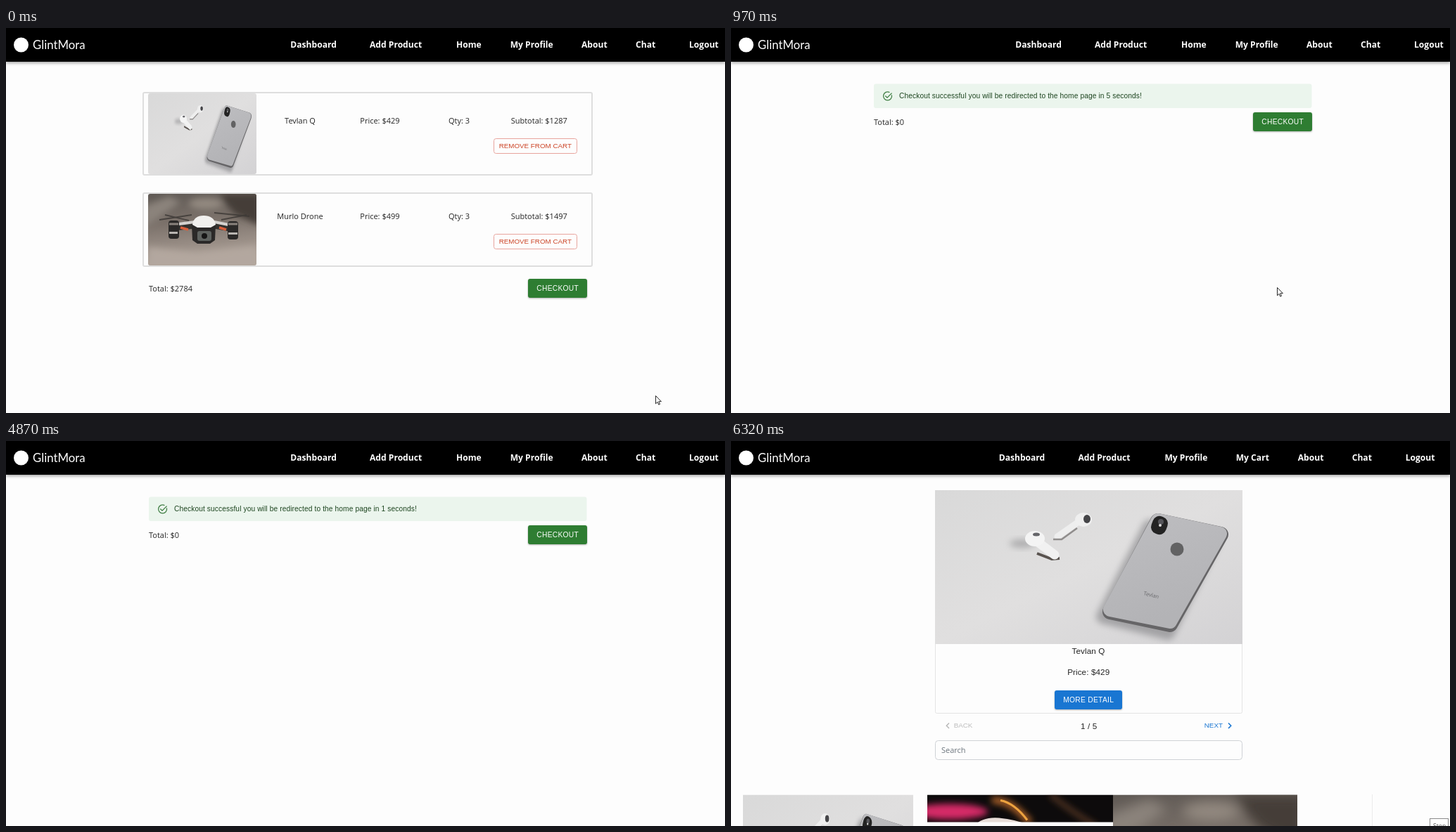
Recreate the animation shown at these times as an HTML page. Size 1022 by 548 pixels, loop 6.38 s.

```html
<!DOCTYPE html>
<html lang="en">
<head>
<meta charset="utf-8">
<title>Shop checkout</title>
<style>
html, body { margin: 0; width: 100%; height: 100%; overflow: hidden; background: #fdfdfd; }
svg { display: block; position: absolute; left: 0; top: 0; }
text { font: 11px "Open Sans", "Noto Sans", sans-serif; fill: #242424; }
.nav text { font-size: 12.1px; font-weight: 700; fill: #fff; }
.brand { font: 16.8px Lato, sans-serif; fill: #fff; }
.mid { text-anchor: middle; }
.ui { font: 11.66px "Liberation Sans", Arial, sans-serif; letter-spacing: .009em; }
.btn { font: 10.25px "Liberation Sans", Arial, sans-serif; letter-spacing: .0286em; fill: #fff; }
.small { font: 9.8px "Liberation Sans", Arial, sans-serif; }
.remove { fill: #cc4527; }
.frame { fill: none; stroke: #dedede; stroke-width: 2; }
.field { fill: #fdfdfd; stroke: #cfd2d6; }
.hint { fill: #6c757d; }
.raised { filter: drop-shadow(0 1.5px 1px rgba(0,0,0,.3)); }
#alert { position: absolute; left: 239px; top: 90px; white-space: nowrap; color: #1e4620;
  font: 10.2px/14px "Liberation Sans", Arial, sans-serif; letter-spacing: .0107em; }

/* 6380 ms loop */
.step { animation: 6.38s step-end infinite; }
.cart { animation-name: cart; }
.done { animation-name: done; }
.shop { animation-name: shop; }
.wait { animation-name: wait; }
.home { animation-name: home; }
.tip { animation-name: tip; }
.tile2 { animation-name: tile2; }
.tile3 { animation-name: tile3; }
.arrow { animation-name: arrow; }
.hand { animation-name: hand; }
.left::after { content: "5"; animation: count 6.38s step-end infinite; }
.hover { animation: hover 6.38s linear infinite; }
.leave { animation: leave 6.38s linear infinite; }
.pointer { animation: move 6.38s linear infinite; }

@keyframes cart { 0% { visibility: visible } 9.561%, 100% { visibility: hidden } }
@keyframes done { 0% { visibility: hidden } 9.561% { visibility: visible } 85.58%, 100% { visibility: hidden } }
@keyframes shop { 0% { visibility: visible } 85.58%, 100% { visibility: hidden } }
@keyframes wait { 0% { visibility: hidden } 85.58% { visibility: visible } 88.401%, 100% { visibility: hidden } }
@keyframes home { 0% { visibility: hidden } 88.401%, 100% { visibility: visible } }
@keyframes tip { 0% { visibility: hidden } 93.887%, 100% { visibility: visible } }
@keyframes tile2 { 0% { visibility: hidden } 97.022%, 100% { visibility: visible } }
@keyframes tile3 { 0% { visibility: hidden } 99.06%, 100% { visibility: visible } }
@keyframes arrow {
  0% { visibility: visible } 4.389% { visibility: hidden }
  9.561% { visibility: visible } 76.332%, 100% { visibility: hidden }
}
@keyframes hand { 0% { visibility: hidden } 4.389% { visibility: visible } 9.561%, 100% { visibility: hidden } }
@keyframes count {
  0% { content: "5" } 24.138% { content: "4" } 39.655% { content: "3" }
  54.702% { content: "2" } 69.906%, 100% { content: "1" }
}
@keyframes hover { 0%, 4.389% { fill: #2e7d32 } 8.307%, 100% { fill: #1b5e20 } }
@keyframes leave { 0%, 10.3% { fill: #1b5e20 } 15.204%, 100% { fill: #2e7d32 } }
@keyframes move {
  0%, .313% { transform: translate(923px,523px); animation-timing-function: cubic-bezier(.35,.1,.35,1) }
  6.426%, 72.1% { transform: translate(776px,369px); animation-timing-function: cubic-bezier(.4,.2,.8,.9) }
  76.332%, 100% { transform: translate(972px,545px) }
}
</style>
</head>
<body>
<svg width="1022" height="548" viewBox="0 0 1022 548">
  <defs>
    <linearGradient id="desk" x2="1" y2="1">
      <stop stop-color="#d9d9d9"/><stop offset=".5" stop-color="#e0dfdf"/><stop offset="1" stop-color="#d3d2d4"/>
    </linearGradient>
    <linearGradient id="shell" x2=".4" y2="1">
      <stop stop-color="#bdbdc0"/><stop offset="1" stop-color="#b3b3b6"/>
    </linearGradient>
    <linearGradient id="ground" x2=".15" y2="1">
      <stop stop-color="#5f5954"/><stop offset=".45" stop-color="#7d736c"/><stop offset="1" stop-color="#b0a49b"/>
    </linearGradient>
    <filter id="soft" x="-50%" y="-50%" width="200%" height="200%"><feGaussianBlur stdDeviation="5"/></filter>
    <clipPath id="round1"><rect x="202" y="93" width="154" height="115" rx="3"/></clipPath>
    <clipPath id="round2"><rect x="202" y="236" width="154" height="102" rx="3"/></clipPath>

    <symbol id="phone" viewBox="0 0 437 219" preserveAspectRatio="none">
      <rect width="437" height="219" fill="url(#desk)"/>
      <g stroke-linejoin="round">
        <path d="M312 48 246 176 338 199 402 70Z" transform="translate(-7 4)" fill="#77777a" stroke="#77777a" stroke-width="20" opacity=".55" filter="url(#soft)"/>
        <path d="M317 44 249 173 334 191 406 63Z" fill="#666567" stroke="#666567" stroke-width="22"/>
        <path d="M317 43 249 170 334 187 405 62Z" fill="url(#shell)" stroke="url(#shell)" stroke-width="20"/>
      </g>
      <rect x="308" y="37" width="22" height="26" rx="10" transform="rotate(20 319 50)" fill="#232323"/>
      <circle cx="321" cy="45" r="4" fill="#55555a"/>
      <circle cx="320" cy="50" r="2" fill="#ddd"/>
      <circle cx="344" cy="84" r="9.5" fill="#626263"/>
      <text x="296" y="149" transform="rotate(14 296 149)" style="font-size:7.5px;fill:#68686b">Tevlan</text>
      <ellipse cx="124" cy="76" rx="18" ry="6" fill="#858587" opacity=".55" filter="url(#soft)"/>
      <path d="M145 90 166 98 177 97" stroke="#59534f" stroke-width="4" fill="none"/>
      <path d="M141 70 170 92" stroke="#f1f1f1" stroke-width="13" stroke-linecap="round"/>
      <ellipse cx="142" cy="69" rx="14" ry="11" fill="#f4f4f4"/>
      <ellipse cx="144" cy="63" rx="5" ry="2.5" fill="#66666a"/>
      <path d="M207 43 174 66" stroke="#eee" stroke-width="9" stroke-linecap="round"/>
      <path d="M168 70 180 70 202 54" stroke="#908d8c" stroke-width="2.5" fill="none"/>
      <ellipse cx="211" cy="42" rx="12" ry="10" fill="#efefef"/>
      <ellipse cx="216" cy="41" rx="5" ry="6" fill="#454548"/>
    </symbol>

    <symbol id="drone" viewBox="0 0 154 102" preserveAspectRatio="none">
      <rect width="154" height="102" fill="url(#ground)"/>
      <g filter="url(#soft)">
        <path d="M100 0H160V46L122 28Z" fill="#453e39"/>
        <ellipse cx="82" cy="14" rx="24" ry="8" fill="#938980"/>
        <path d="M-5 18 30 4 46 12-5 48Z" fill="#8b837c"/>
        <path d="M0 76 70 84 154 74V106H0Z" fill="#b3a79f"/>
      </g>
      <path d="M16 37 62 30M24 30 58 38M94 27 144 32M104 37 140 30" stroke="#3c3835" stroke-width="1.8" opacity=".8"/>
      <path d="M36 48 66 45M94 45 122 50" stroke="#34322f" stroke-width="9"/>
      <path d="M44 43 66 40M94 40 114 44" stroke="#d5d2cf" stroke-width="4"/>
      <path d="M46 48 57 51M101 48 111 51" stroke="#d9603c" stroke-width="3.5"/>
      <g fill="#2b2928">
        <rect x="29" y="38" width="15" height="26" rx="4"/><rect x="113" y="39" width="15" height="26" rx="4"/>
        <path d="M62 44H96L95 66 88 71H70L63 66Z"/>
      </g>
      <path d="M30 54H42V57H30ZM114 55H127V58H114Z" fill="#b9b5b1"/>
      <path d="M30 43H43M114 43H127" stroke="#89827c" stroke-width="3"/>
      <path d="M63 44C64 35 70 31 79 31S95 35 96 44L89 48H70Z" fill="#f1f0ee"/>
      <rect x="70" y="53" width="20" height="14" rx="3" fill="#5e625f"/>
      <circle cx="80" cy="60" r="4" fill="#161616"/>
    </symbol>

    <g id="nav2" class="nav">
      <text y="27.5"><tspan x="393">Dashboard</tspan><tspan x="505.7">Add Product</tspan><tspan x="628.7">My Profile</tspan><tspan x="730">My Cart</tspan><tspan x="818">About</tspan><tspan x="895">Chat</tspan><tspan x="971">Logout</tspan></text>
    </g>
    <g id="remove">
      <rect x="693.5" y="157.5" width="118" height="21" rx="3" fill="#fdfdfd" stroke="#e8a49d"/>
      <text class="small remove mid" x="752.3" y="171.2">REMOVE FROM CART</text>
    </g>
    <rect id="pad" width="84" height="27" rx="3"/>
  </defs>

  <rect width="1022" height="548" fill="#fdfdfd"/>
  <rect width="1022" height="48" style="filter:drop-shadow(0 2px 2px rgba(0,0,0,.35))"/>
  <circle cx="21.5" cy="24" r="10.5" fill="#fff"/>
  <text class="brand" x="38" y="30">GlintMora</text>

  <g class="step shop nav">
    <text y="27.5"><tspan x="404.3">Dashboard</tspan><tspan x="517">Add Product</tspan><tspan x="640">Home</tspan><tspan x="716.7">My Profile</tspan><tspan x="818">About</tspan><tspan x="895">Chat</tspan><tspan x="971">Logout</tspan></text>
  </g>

  <g class="step cart">
    <rect class="frame" x="195" y="92" width="638" height="117" rx="2"/>
    <g clip-path="url(#round1)"><use href="#phone" x="202" y="93" width="154" height="115"/></g>
    <text class="mid" y="135.5"><tspan x="418">Tevlan Q</tspan></text>
    <text y="135.5"><tspan x="503.3">Price: $429</tspan><tspan x="629">Qty: 3</tspan><tspan x="717.7">Subtotal: $1287</tspan></text>
    <use href="#remove"/>

    <rect class="frame" x="195" y="235" width="638" height="104" rx="2"/>
    <g clip-path="url(#round2)"><use href="#drone" x="202" y="236" width="154" height="102"/></g>
    <text class="mid" y="271.5"><tspan x="418">Murlo Drone</tspan></text>
    <text y="271.5"><tspan x="503.3">Price: $499</tspan><tspan x="629">Qty: 3</tspan><tspan x="717.7">Subtotal: $1497</tspan></text>
    <use href="#remove" y="136"/>

    <text x="203" y="374.7">Total: $2784</text>
    <g class="raised"><use class="hover" href="#pad" x="742" y="357"/></g>
    <text class="btn mid" x="784.2" y="374.2">CHECKOUT</text>
  </g>

  <g class="step done">
    <rect x="203" y="79.5" width="622.5" height="34.5" rx="3" fill="#ebf5ed"/>
    <path d="M228.4 95.4A6 6 0 1 1 225.4 91.6M219.3 96.5 222 99.2 228.6 92.6" fill="none" stroke="#417f45" stroke-width="1.3"/>
    <text x="203" y="137.5">Total: $0</text>
    <g class="raised"><use class="leave" href="#pad" x="742" y="120"/></g>
    <text class="btn mid" x="784.2" y="137">CHECKOUT</text>
  </g>

  <g class="step wait">
    <use href="#nav2"/>
    <rect class="field" x="296.5" y="73.5" width="436" height="27" rx="4"/>
    <text class="hint" x="305.3" y="91.7">Search</text>
  </g>

  <g class="step home">
    <use href="#nav2" x="-12.3"/>
    <rect x="290.5" y="70.5" width="436" height="317" rx="2" fill="#fdfdfd" stroke="#e4e4e4"/>
    <use href="#phone" x="290" y="70" width="437" height="219"/>
    <text class="ui mid" x="508" y="303">Tevlan Q</text>
    <text class="ui mid" x="508.2" y="333">Price: $429</text>
    <rect class="raised" x="460" y="355" width="96" height="27" rx="3" fill="#1976d2"/>
    <text class="btn mid" x="508.2" y="372.2">MORE DETAIL</text>
    <path d="M310 401.5 306.3 405.2 310 409" fill="none" stroke="#b5b5b5" stroke-width="1.4"/>
    <text class="small" x="316.7" y="407.7" style="fill:#bdbdbd">BACK</text>
    <text class="ui mid" x="508.7" y="410">1 / 5</text>
    <text class="small" x="672.8" y="407.7" style="fill:#1976d2">NEXT</text>
    <path d="M707 401.5 710.7 405.2 707 409" fill="none" stroke="#1976d2" stroke-width="1.6"/>
    <rect class="field" x="290.5" y="426.5" width="436" height="27" rx="4"/>
    <text class="hint" x="299" y="444.2">Search</text>
    <use href="#phone" x="17" y="503.5" width="242" height="182"/>
    <path d="M911.5 503V548" stroke="#ebebeb"/>
  </g>

  <svg class="step tile2" x="279" y="503.5" width="264" height="45" viewBox="0 0 264 45">
    <rect width="264" height="45" fill="#0d0b0c"/>
    <g filter="url(#soft)">
      <ellipse cx="32" cy="24" rx="54" ry="11" fill="#d62a68"/>
      <path d="M92 8Q118 6 146 40" fill="none" stroke="#b8672a" stroke-width="9"/>
      <path d="M175 0Q205 24 240 45" fill="none" stroke="#5d3a26" stroke-width="6"/>
    </g>
    <path d="M104 8Q124 12 142 36" fill="none" stroke="#eda33f" stroke-width="3"/>
    <path d="M66 45Q78 31 102 33T150 45Z" fill="#e8ded9"/>
    <rect y="39" width="264" height="6" fill="#fdfdfd"/>
  </svg>
  <g class="step tile3"><use href="#drone" x="543" y="503.5" width="262" height="174"/></g>
  <g class="step tip">
    <rect x="993.5" y="537.5" width="26" height="16" fill="#fff" stroke="#8a8a8a"/>
    <text x="998" y="550.5" style="font-size:8.6px;fill:#575757">Stop</text>
  </g>

  <g class="pointer" stroke="#111" stroke-width=".9" stroke-linejoin="round" fill="#fff">
    <path class="step arrow" d="M.5 .5V11.8L3.1 9.4 4.8 13.2 6.5 12.4 4.8 8.7H8.4Z"/>
    <path class="step hand" transform="translate(2 -1)" d="M0 1c1 0 1.6.7 1.6 1.7V8c1.2-.7 2.4-.2 2.6.6 1-.5 2.1 0 2.3.9 1-.3 1.9.3 1.9 1.5V13c0 2-.8 3-1.2 5H-1.2C-2 15.5-5 12.5-5.2 11c-.2-1.2 1.3-1.8 2.2-.8L-1.6 11.5V2.7C-1.6 1.7-1 1 0 1z"/>
  </g>
</svg>
<div id="alert" class="step done">Checkout successful you will be redirected to the home page in <span class="left"></span> seconds!</div>
</body>
</html>
```
